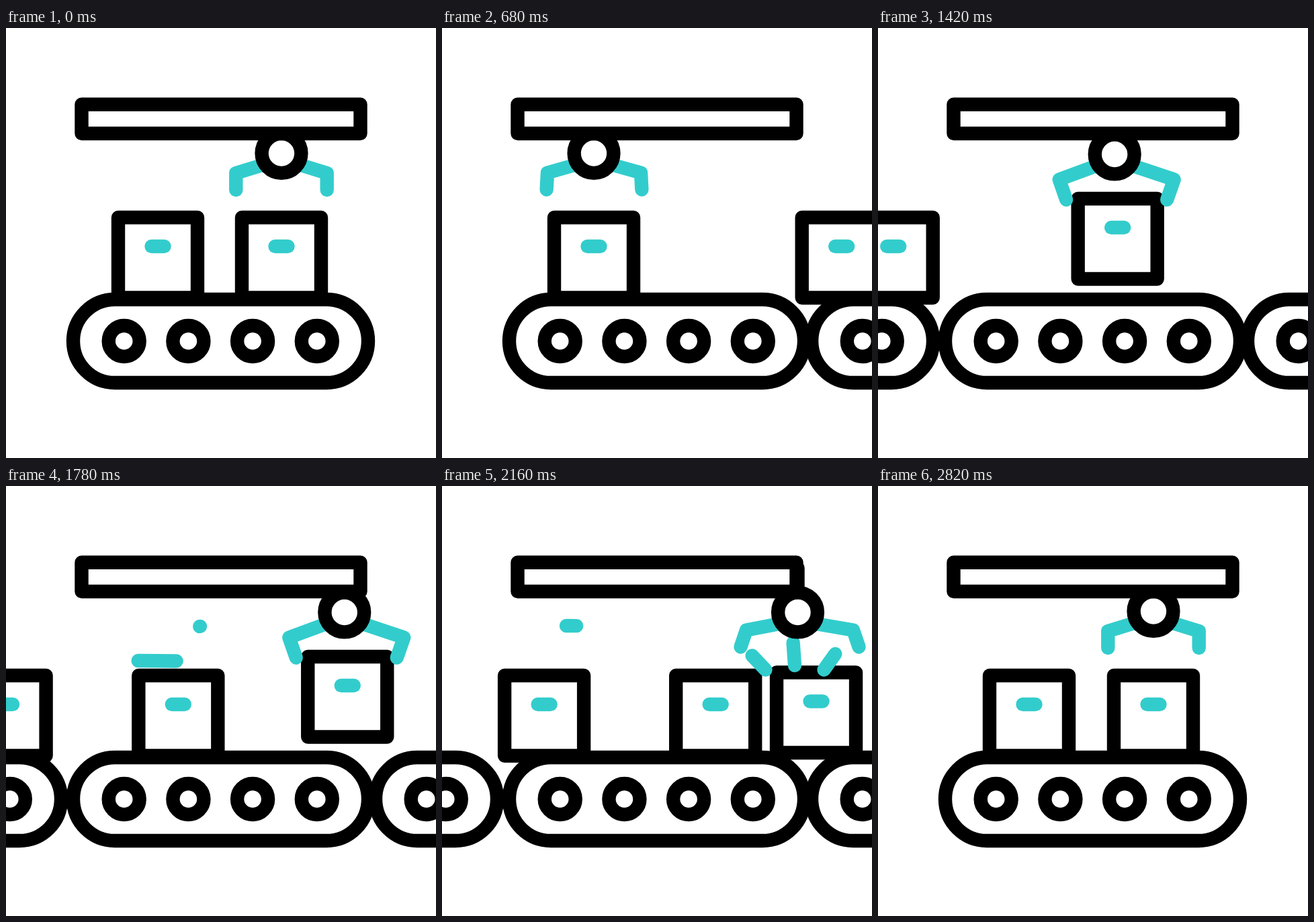
Write an HTML page with a canvas that moves like this. It is 640 px wide and 640 px high and loops after 3.02 s.

```html
<!DOCTYPE html>
<html lang="en">
<head>
<meta charset="utf-8">
<title>Conveyor</title>
<style>
  html, body { margin: 0; width: 100%; height: 100%; overflow: hidden; background: #fff; }
  canvas { display: block; width: 100vw; height: 100vh; }
</style>
</head>
<body>
<canvas id="stage" width="640" height="640"></canvas>
<script>
const LOOP = 3020, STEP = 20;
const TEAL = '#33cccc', INK = '#000', PAPER = '#fff', WEIGHT = 20.4;
const ctx = document.getElementById('stage').getContext('2d');
ctx.lineCap = ctx.lineJoin = 'round';

// Progress from 0 to 1 between two times, linear or eased at both ends.
const span = (t, a, b) => Math.min(1, Math.max(0, (t - a) / (b - a)));
const ease = (t, a, b) => {
  const u = span(t, a, b);
  return u * u * (3 - 2 * u);
};
const mix = (a, b, k) => a + (b - a) * k;

function paint(color, fill) {
  if (fill) { ctx.fillStyle = fill; ctx.fill(); }
  ctx.strokeStyle = color;
  ctx.lineWidth = WEIGHT;
  ctx.stroke();
}
function line(color, ...points) {
  ctx.beginPath();
  for (const [x, y] of points) ctx.lineTo(x, y);
  paint(color);
}
function rect(x, y, w, h, r = 0) {
  ctx.beginPath();
  if (r) ctx.roundRect(x, y, w, h, r); else ctx.rect(x, y, w, h);
  paint(INK, PAPER);
}
function ring(x, y, r) {
  ctx.beginPath();
  ctx.arc(x, y, r, 0, 2 * Math.PI);
  paint(INK, PAPER);
}

function belt(dx) {
  rect(100 + dx, 404, 439, 124, 62);
  for (let i = 0; i < 4; i++) ring(175.7 + dx + i * 95.7, 466, 23);
}

function box(x, dy = 0) {
  rect(x - 59, 282 + dy, 118, 119.5);
  line(TEAL, [x - 9.5, 325 + dy], [x + 9.5, 325 + dy]);
}

// A line whose head runs ahead of its tail by the given lag.
function dash(t, start, time, lag, [x0, y0], [x1, y1]) {
  if (t <= start || t >= start + lag + time) return;
  const at = s => {
    const k = ease(t, s, s + time);
    return [mix(x0, x1, k), mix(y0, y1, k)];
  };
  line(TEAL, at(start + lag), at(start));
}

function sparks(t) {
  for (const i of [-1, 0, 1]) {
    const side = Math.abs(i), length = 34 - 5 * side;
    const angle = (39.5 * i - 94) * Math.PI / 180;
    const x = 525 + 43.5 * i, y = 267 + 6.5 * side;
    dash(t, 2060, 100, 100, [x, y],
      [x + length * Math.cos(angle), y + length * Math.sin(angle)]);
  }
}

// Elbow and tip of the right arm, measured from the hub.
const REST = [[67.7, 29.5], [67.7, 54.5]];
const OPEN = [[79.5, 26.5], [88, 51.5]];
const GRIP = [[85.5, 37.5], [75, 67.5]];

function claw(t, x, y) {
  const open = ease(t, 640, 800) - ease(t, 820, 920) + ease(t, 2020, 2140) - ease(t, 2180, 2500);
  const grip = ease(t, 800, 920) - ease(t, 2020, 2120);
  const lean = 3 * (open + grip);
  const pose = (i, j) => REST[i][j]
    + open * (OPEN[i][j] - REST[i][j]) + grip * (GRIP[i][j] - REST[i][j]);
  for (const side of [-1, 1]) {
    const joint = i => [x + lean + side * pose(i, 0), y + pose(i, 1)];
    line(TEAL, [x + side * 27, y + 17], joint(0), joint(1));
  }
  line(INK, [x, 122], [x, y - 30]);
  ring(x, y, 29.4);
}

function draw(t) {
  ctx.fillStyle = PAPER;
  ctx.fillRect(0, 0, 640, 640);

  const leave = ease(t, 2220, 2760);
  belt(0);
  belt(560 - 110 * (ease(t, 210, 690) - leave));
  belt(-550 + 93 * (ease(t, 760, 1240) - leave));

  // The carried load speeds up steadily and brakes late.
  const carry = 303.5 * (1 - (1 - span(t, 785, 1862) ** 2.05) ** 1.3);
  const lift = ease(t, 940, 1360);
  const drop = ease(t, 2000, 2215);

  box(mix(410, 730, ease(t, 210, 1062)));
  box(226 + carry + 4.5 * lift + 190 * ease(t, 2010, 2700), 28 * (drop - lift));
  box(mix(-145, 410, ease(t, 965, 2212)));
  box(mix(-154, 225, ease(t, 1187, 2540)));

  dash(t, 1600, 215, 78, [310, 261], [188, 260]);
  dash(t, 1760, 395, 100, [289, 209], [185, 208]);
  sparks(t);

  const x = 410 - 184 * ease(t, 210, 680) + carry - 119.5 * ease(t, 2170, 2760);
  const y = 186.5 + 29.5 * ease(t, 690, 880) - 28 * lift - 1.5 * ease(t, 2180, 2600);
  claw(t, x, y);
  rect(112.5, 113.8, 415, 43.2);
}

const begin = performance.now();
function tick() {
  const t = (performance.now() - begin) % LOOP;
  draw(Math.floor(t / STEP) * STEP);
  requestAnimationFrame(tick);
}
tick();
</script>
</body>
</html>
```
